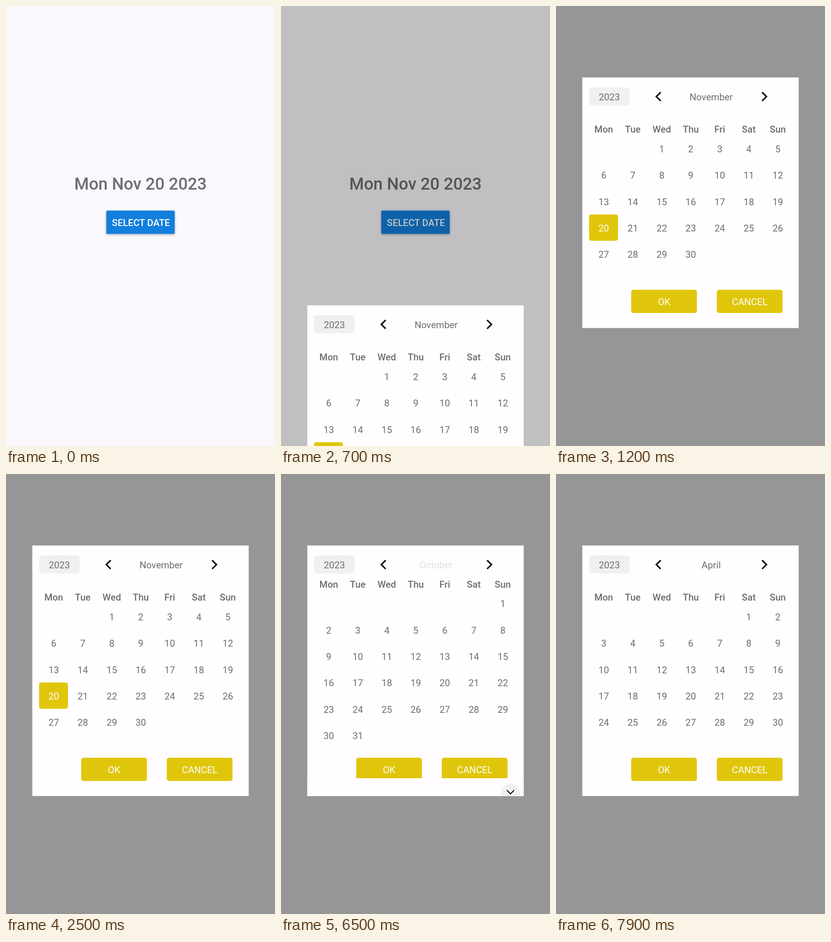
Animation, 586 px wide and 956 px high, one loop 8 s. Source, as an HTML page:

```html
<!DOCTYPE html>
<html lang="en">
<head>
<meta charset="utf-8">
<title>Date picker</title>
<style>
  html, body { margin: 0; height: 100%; overflow: hidden; background: #faf8fc; }
  svg { display: block; width: 586px; height: 956px; font: 20.5px Roboto, sans-serif; text-anchor: middle; fill: #6f6d70; }
  .bold { font-weight: 500; }
  .white { fill: #fff; }
  .gold { fill: #e0c60b; }
  .pill { fill: #f0eff2; }
  .paper { fill: #fffdff; }
  .line { fill: none; stroke: #000; stroke-width: 3.2; }
  #open { fill: #127fdd; filter: drop-shadow(0 2px 2.5px rgba(0, 0, 0, .3)); }
</style>
</head>
<body>
<svg viewBox="0 0 586 956">
  <clipPath id="card"><rect x="57.3" y="155.3" width="471.4" height="544.4"/></clipPath>
  <clipPath id="face"><rect x="218.5" y="444.5" width="149" height="50.5" rx="2"/></clipPath>

  <rect width="586" height="956" fill="#faf8fc"/>
  <text class="bold" x="293" y="399" font-size="36.4">Mon Nov 20 2023</text>
  <rect id="open" x="218.5" y="444.5" width="149" height="50.5" rx="2"/>
  <circle id="ripple" cx="293" cy="470" clip-path="url(#face)" fill="#000"/>
  <text class="bold white" x="294" y="478">SELECT DATE</text>
  <rect id="shade" width="586" height="956" fill="#000"/>

  <g id="dialog">
    <rect class="paper" x="57.3" y="155.3" width="471.4" height="544.4"/>
    <rect class="pill" x="72" y="177" width="88.5" height="39" rx="5"/>
    <text x="116.3" y="205">2023</text>
    <path id="prev" class="line" d="M228 187.5l-9.5 9.3 9.5 9.3"/>
    <text id="title" x="338" y="205"></text>
    <path class="line" d="M449 187.5l9.5 9.3-9.5 9.3"/>
    <g id="grid"></g>
    <rect class="gold" x="163.8" y="616.5" width="143.2" height="50.5" rx="5"/>
    <text class="white" x="235.4" y="650">OK</text>
    <rect class="gold" x="350.3" y="616.5" width="143.2" height="50.5" rx="5"/>
    <text class="white" x="422" y="650">CANCEL</text>
    <g clip-path="url(#card)">
      <g id="sheet">
        <rect class="paper" x="57.3" y="166" width="471.4" height="560"/>
        <circle class="pill" cx="500" cy="199" r="21"/>
        <path class="line" stroke-width="2" style="stroke-width:2" d="M492 192l8 8 8-8"/>
        <g id="months"></g>
      </g>
    </g>
  </g>
</svg>
<script>
const LOOP = 8000, STEP = 100, TRAVEL = 956;
const DAYS = ['Mon', 'Tue', 'Wed', 'Thu', 'Fri', 'Sat', 'Sun'];
const MONTHS = ['January', 'February', 'March', 'April', 'May', 'June', 'July',
  'August', 'September', 'October', 'November', 'December'];
const $ = id => document.getElementById(id);
const clamp = x => Math.min(1, Math.max(0, x));
const ramp = (t, start, length) => clamp((t - start) / length);
const label = (x, y, text, cls = '') => `<text class="${cls}" x="${x}" y="${y}">${text}</text>`;
const shiftY = (id, y) => $(id).setAttribute('transform', `translate(0 ${y})`);

// cubic-bezier(.25, .1, .25, 1)
function ease(x) {
  const bezier = (a, b, s) => 3 * a * s * (1 - s) ** 2 + 3 * b * s * s * (1 - s) + s ** 3;
  let lo = 0, hi = 1;
  for (let i = 0; i < 24; i++) {
    const mid = (lo + hi) / 2;
    if (bezier(.25, .25, mid) < x) lo = mid; else hi = mid;
  }
  return x <= 0 ? 0 : x >= 1 ? 1 : bezier(.1, 1, lo);
}

const slide = (t, start) => TRAVEL * (1 - ease(ramp(t, start, 246)));
const press = (t, start, end) => 1 - .8 * (ramp(t, start - 75, 150) - ramp(t, end, 250));

let shown = -1;
function showMonth(month) {
  if (month === shown) return;
  shown = month;
  const first = (new Date(2023, month, 1).getDay() + 6) % 7;
  const count = new Date(2023, month + 1, 0).getDate();
  const top = Math.ceil((first + count) / 7) > 5 ? -28.7 : 0;
  const colX = col => 104 + 63.2 * col;
  let html = DAYS.map((day, col) => label(colX(col), 275.3 + top, day, 'bold')).join('');
  for (let day = 1; day <= count; day++) {
    const cell = first + day - 1;
    const x = colX(cell % 7), y = 318 + top + 57.3 * Math.floor(cell / 7);
    const chosen = month === 10 && day === 20;
    if (chosen) html += `<rect class="gold" x="${x - 32}" y="${y - 37}" width="63" height="57" rx="5"/>`;
    html += label(x, y, day, chosen ? 'white' : '');
  }
  $('grid').innerHTML = html;
  $('title').textContent = MONTHS[month];
}

$('months').innerHTML = MONTHS.map((name, i) =>
  label(150 + 143 * (i % 3), 300 + 100 * Math.floor(i / 3), name)).join('');
const april = $('months').children[3];

function draw(t) {
  $('ripple').setAttribute('r', 80 * ramp(t, 50, 250));
  $('ripple').style.opacity = .08 * (1 - ramp(t, 500, 200));
  $('shade').style.opacity = .4 * ease(ramp(t, 612, 265));
  shiftY('dialog', slide(t, 630));

  showMonth(t < 5300 ? 10 : t < 7300 ? 9 : 3);
  $('prev').style.opacity = press(t, 5000, 5300);
  $('title').style.opacity = t < 7300 ? press(t, 6200, 6600) : 1;

  shiftY('sheet', t < 7400 ? slide(t, 6430) : TRAVEL * ease(ramp(t, 7370, 246)));
  april.style.opacity = press(t, 7100, 7300);
}

let start;
function tick(now) {
  start ??= now;
  draw(Math.floor((now - start + 5) / STEP) * STEP % LOOP);
  requestAnimationFrame(tick);
}
draw(0);
requestAnimationFrame(tick);
</script>
</body>
</html>
```
